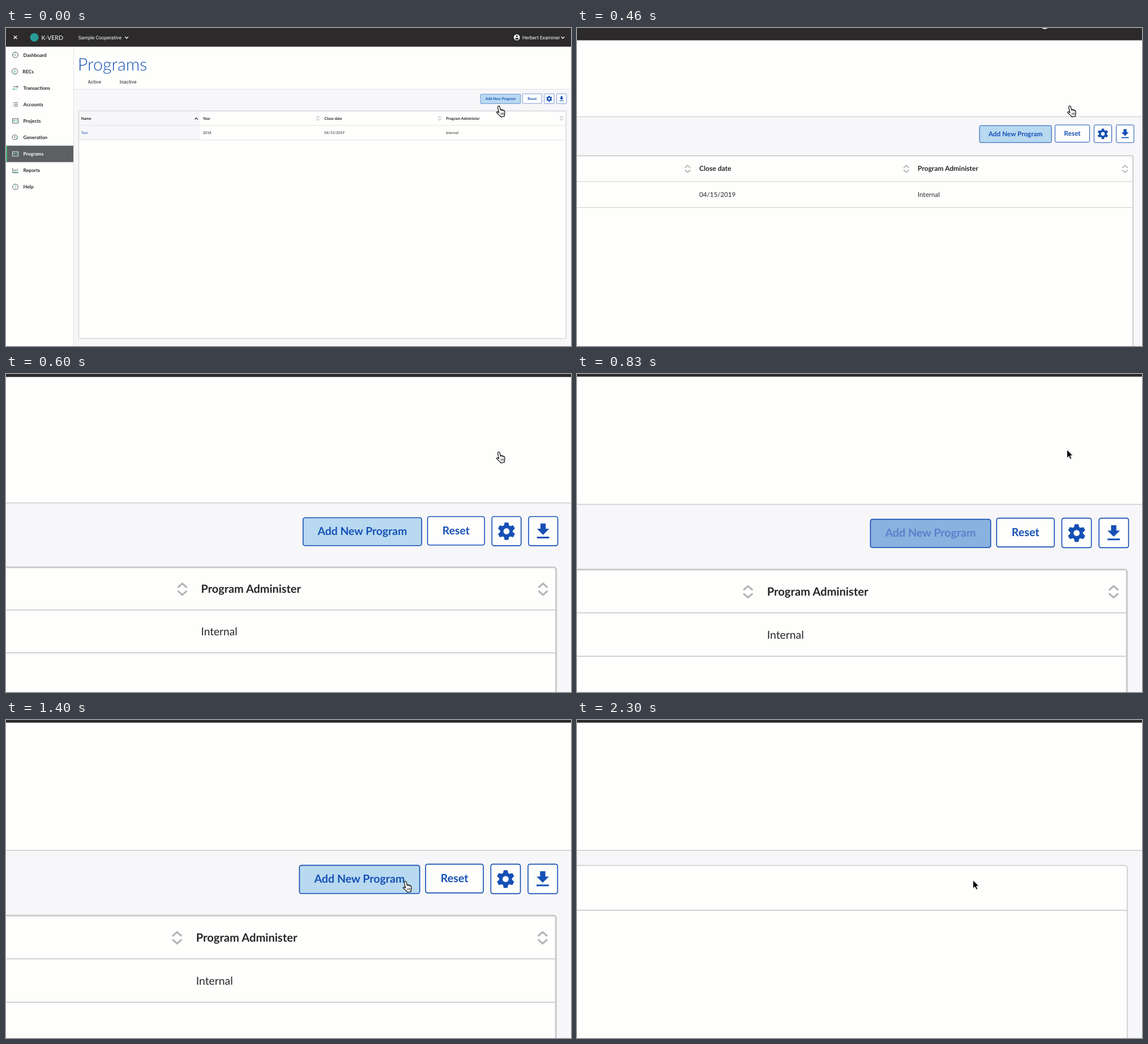
Recreate the animation shown at these times as an HTML page. Size 998 by 561 pixels, loop 2.4 s.

```html
<!DOCTYPE html>
<html lang="en">
<head>
<meta charset="utf-8">
<title>Programs</title>
<style>
  html, body { margin: 0; width: 100%; height: 100%; overflow: hidden; background: #fefefd; }
  svg { display: block; width: 998px; height: 561px; }
  text { font-family: Lato, "Open Sans", sans-serif; fill: #262626; text-rendering: geometricPrecision; }
  .ui { font-family: Roboto, Arial, sans-serif; font-size: 8.55px; }
  .light { fill: #fff; }
  .title { font-size: 30.5px; font-weight: 300; fill: #1650b5; }
  .nav { font-size: 8.5px; font-weight: 700; }
  .th { font-size: 6.72px; font-weight: 700; }
  .td { font-size: 6.45px; }
  .btn { font-size: 6.55px; font-weight: 700; fill: #1650b5; text-anchor: middle; }
  .mid { text-anchor: middle; }
  .status { font-family: Inter, Roboto, sans-serif; font-size: 6.2px; fill: #666; }
  .line { fill: none; stroke: #cbcbcd; stroke-width: .55; }
  .box { fill: #fefefd; stroke: #1650b5; stroke-width: .55; }
  .blue { fill: #1650b5; }
  .icon { fill: none; stroke: #3f4648; stroke-width: .9; }
  .icon .g { stroke: #35b096; }
  .icon.on { stroke: #fff; }
  .icon.on .g { stroke: #6fe0ae; }
  .sort { fill: none; stroke: #b5b5b5; stroke-width: 1.05; }
  .chev { fill: none; stroke-width: 1.3; }
</style>
</head>
<body>
<svg viewBox="0 0 998 561" xmlns="http://www.w3.org/2000/svg">
  <rect width="998" height="561" fill="#fefefd"/>
  <g id="page">
    <rect x="119.5" y="108" width="879" height="453" fill="#f7f7f9"/>
    <path class="line" d="M119.5 33V561M119.5 108H998"/>
    <rect width="998" height="32.9" fill="#2c2a2a"/>
    <path d="M13.7 13.7l5.6 5.6m0-5.6l-5.6 5.6" stroke="#fff" stroke-width="1.3"/>
    <circle cx="50" cy="16.5" r="7.5" fill="#2a9c98"/>
    <text class="light" x="62.5" y="20.6" font-size="10.7">K-VERD</text>
    <text class="ui light" x="127.7" y="19.7">Sample Cooperative</text>
    <path class="chev" stroke="#fff" d="M210.3 15.5l2.8 2.8 2.8-2.8M980.7 15.5l2.8 2.8 2.8-2.8"/>
    <circle cx="902.3" cy="16.5" r="5.3" fill="#fff"/>
    <circle cx="902.3" cy="14.5" r="1.6" fill="#2c2a2a"/>
    <path d="M899.1 18.9c.4-2.2 6-2.2 6.4 0-1.6 2.1-4.8 2.1-6.4 0z" fill="#2c2a2a"/>
    <text class="ui light" x="912" y="19.7">Herbert Examiner</text>

    <g id="nav"></g>

    <text class="title" x="126.7" y="74.5">Programs</text>
    <text class="ui mid" x="156.2" y="97.8">Active</text>
    <text class="ui mid" x="215.6" y="97.8">Inactive</text>

    <g id="content">
      <rect id="add" x="838.1" y="116.77" width="70.8" height="16.65" rx="1.2" stroke="#1650b5" stroke-width=".55"/>
      <g id="ring" fill="none">
        <rect x="838.4" y="117.1" width="70.2" height="16" rx=".8" stroke="#93b6df" stroke-width=".8"/>
        <rect x="836.8" y="115.4" width="73.4" height="19.4" rx="1.9" stroke="#c3d3ea" stroke-width=".8"/>
        <rect x="837.4" y="116" width="72.2" height="18.2" rx="1.5" stroke="#6a95d0" stroke-width="1.4"/>
      </g>
      <text id="addText" class="btn" x="873.5" y="127.1">Add New Program</text>
      <rect class="box" x="912.4" y="116.1" width="34" height="16.95" rx="1.2"/>
      <text class="btn" x="929.4" y="126.6">Reset</text>
      <rect class="box" x="950.8" y="116.1" width="17.4" height="17.35" rx="1.2"/>
      <g id="gear" class="blue" transform="translate(959.5 124.85)"></g>
      <rect class="box" x="972.7" y="116.1" width="17.4" height="17.35" rx="1.2"/>
      <path class="blue" transform="translate(975.1 118.7) scale(.52)" d="M19 9h-4V3H9v6H5l7 7 7-7zM5 18v2h14v-2z"/>

      <rect x="128.5" y="146.35" width="860.6" height="401.4" rx="1.3" fill="#fefefd" stroke="#c9c9cc"/>
      <rect x="129" y="146.9" width="214" height="50.3" fill="#f7f7fa"/>
      <path class="line" d="M129 171.8H988.7M129 197.3H988.7"/>
      <path class="chev" stroke="#222" d="M333.4 161.4l2.8-2.8 2.8 2.8"/>
      <g id="table"></g>
    </g>
    <g id="next" transform="translate(665.333 31.333) scale(.333333)">
      <rect x="-1600" y="256.5" width="2572" height="1300" rx="5" fill="#fefefd" stroke="#cacacc" stroke-width="1.6"/>
      <path d="M-1600 335.6H972" stroke="#cacacc" stroke-width="1.6"/>
    </g>
  </g>

  <g id="bubble">
    <path d="M-2 550H328.5q3 0 3 3V563H-2z" fill="#fdfdfd" stroke="#c4c4c6"/>
    <text class="status" x="1.5" y="558">Waiting for k-verd-staging.herokuapp.com...</text>
  </g>

  <g id="cursor">
    <g id="hand" transform="translate(1.6 1.8) scale(1.06)" stroke="#111" stroke-linejoin="round">
      <path fill="#fff" stroke-width="1.2" d="M4 .7C5.2.4 5.9 1.4 6.2 2.5L7.5 7C8.2 6.2 9.5 6.4 9.8 7.3c.7-.6 2.1-.3 2.3.7.8-.5 2 0 2.2 1.2.6 2.8.4 4.8-.6 6.8l.2 2-6 1-.6-1.4C5.4 16.5 3.4 14 1.4 12.2.4 11 1.7 9.8 3.1 10.6L4.9 12 2.8 3C2.6 2 3 1 4 .7z"/>
      <path fill="none" stroke-width=".8" d="M7.5 7l.5 2M9.8 7.3l.5 2M12.1 8l.4 1.8M8 12.2l.7 3.4M10.1 11.9l.6 3.4M12 11.6l.4 3.2"/>
    </g>
    <g id="arrow">
      <path d="M1 2v14l3.3-3 2.3 5 2.6-1.1L7 12h4z" fill="#000" opacity=".18"/>
      <path d="M.4.6v14.6l3.4-3.1 2.3 5.1 2.5-1.1-2.2-5 4.3-.3z" fill="#000" stroke="#fff" stroke-width=".9"/>
    </g>
  </g>
</svg>
<script>
const $ = id => document.getElementById(id);

// Sidebar icons, drawn around their own centre
const card = '<path d="M-5-4H5V4H-5z"/><path class="g" d="M-3-1.5h2.5v2H-3zM1.5-1.5h2M1.5.5h2"/>';
const disc = '<circle r="4.9"/>';
const items = [
  ['Dashboard', disc + '<path class="g" d="M0-4.5v2M-4.4 0h1.6M4.4 0H2.8"/><path d="M-1.5-1.5L.5 1.5"/>'],
  ['RECs', disc + '<path class="g" d="M1-3L-1.6.5H1.4L-.8 3.2"/>'],
  ['Transactions', '<path d="M-3.5-2H4.5M2.5-4l2 2-2 2"/><path class="g" d="M3.5 2.2H-4.5M-2.5.2l-2 2 2 2"/>'],
  ['Accounts', '<path d="M-2.5-3H4.5M-2.5 0H4.5M-2.5 3H4.5"/><path class="g" d="M-4.5-3h1M-4.5 0h1M-4.5 3h1"/>'],
  ['Projects', card],
  ['Generation', '<circle cx="-1" cy="-.3" r="4.3"/><path d="M-1-2.8V0L1 1"/><path class="g" d="M1.5 3.8L4.8 1.2M2-3L4.8-.5"/>'],
  ['Programs', card],
  ['Reports', '<path d="M-4.5-4.5V4.3H5M-3 .5L-.5-1 1.5.3 4.5-2.8"/><path class="g" d="M-2.5 4V2M0 4V1M2.3 4V2M4.3 4V0"/>'],
  ['Help', disc + '<path class="g" d="M-1.4-1.2C-1.2-3 1.6-2.8 1.4-1 1.2 0 0 0 0 1.2M0 2v1"/>']
];
$('nav').innerHTML = items.map(([name, art], i) => {
  const y = 47.5 + 29.1 * i, on = name === 'Programs', recs = name === 'RECs';
  const back = on ? `<rect y="${y - 14.5}" width="119" height="29" fill="#5c6063"/>
    <rect y="${y - 14.5}" width="1.6" height="29" fill="#4fd08b"/>` : '';
  return `${back}<g class="icon ${on ? 'on' : ''}" transform="translate(${recs ? 15.6 : 16.5} ${y})">${art}</g>
    <text class="nav ${on ? 'light' : ''}" x="${recs ? 29.3 : 30.6}" y="${y + 3}">${name}</text>`;
}).join('');

const columns = [
  [132.8, 'Name', 'Test'], [347.7, 'Year', '2018'],
  [562.3, 'Close date', '04/15/2019'], [777.25, 'Program Administer', 'Internal']
];
$('table').innerHTML = columns.map(([x, head, cell], i) =>
  `<text class="th" x="${x}" y="161.5">${head}</text>
   <text class="td ${i ? '' : 'blue'}" x="${x}" y="186.9">${cell}</text>` +
  (i ? `<path class="sort" transform="translate(${550.8 + 215.25 * (i - 1)} 159.4)"
    d="M-2.7-1L0-3.4 2.7-1M-2.7 1L0 3.4 2.7 1"/>` : '')
).join('');

$('gear').innerHTML = [0, 60, 120, 180, 240, 300].map(a =>
  `<path transform="rotate(${a})" d="M-1.7-2.8L-1.1-5.2H1.1L1.7-2.8z"/>`).join('') +
  '<circle r="3.75"/><circle r="1.8" fill="#fefefd"/>';

const clamp = v => Math.max(0, Math.min(1, v));
const ramp = (t, from, span) => clamp((t - from) / span);
const mix = (a, b, k) => a + (b - a) * k;
const rgb = (a, b, k) => `rgb(${a.map((v, i) => Math.round(mix(v, b[i], k)))})`;
const smooth = u => u * u * (3 - 2 * u);
const out = u => 1 - (1 - u) ** 3;

// Keys: [time, values, easing into this key]
function track(keys, t) {
  let i = 1;
  while (i < keys.length - 1 && t > keys[i][0]) i++;
  const [t0, from] = keys[i - 1], [t1, to, ease = u => u] = keys[i];
  const k = ease(ramp(t, t0, t1 - t0));
  return from.map((v, n) => mix(v, to[n], k));
}

const zoom = [[0, [1]], [200, [1.01]], [300, [1.025]], [400, [1.0548]], [433, [1.25]],
  [467, [1.8]], [500, [2.42]], [533, [2.787]], [600, [2.96]], [700, [3]]];
const path = [[0, [864, 135]], [780, [864, 135]], [833, [865, 133]],
  [1067, [875, 244], smooth], [1167, [372, 361], smooth], [1400, [699, 282], out]];
const pale = [184, 217, 240], blue = [22, 80, 181], white = [255, 255, 255];
const show = (id, on) => $(id).style.display = on ? '' : 'none';

function draw(t) {
  const [s] = track(zoom, t), [x, y] = track(path, t);
  const loaded = t >= 1930, hand = t < 780 || (t > 1244 && !loaded);
  const idle = ramp(t, 791, 150) - ramp(t, 1244, 150);

  // The zoom keeps the point (998, 47) in place
  $('page').setAttribute('transform', `translate(${998 * (1 - s)} ${47 * (1 - s)}) scale(${s})`);
  $('add').setAttribute('fill', rgb(pale, blue, idle));
  $('addText').style.fill = rgb(blue, white, idle);
  $('ring').style.opacity = ramp(t, 1667, 133);
  show('content', !loaded);
  show('next', loaded);
  $('bubble').style.opacity = t < 1890 ? 0 : 1 - ramp(t, 2100, 200);
  $('cursor').setAttribute('transform', `translate(${x} ${y})`);
  show('hand', hand);
  show('arrow', !hand);
}

const start = performance.now(), step = 100 / 3;
function tick() {
  const t = (performance.now() - start) % 2400;
  draw(Math.floor((t + 7) / step) * step % 2400);
  requestAnimationFrame(tick);
}
tick();
</script>
</body>
</html>
```
